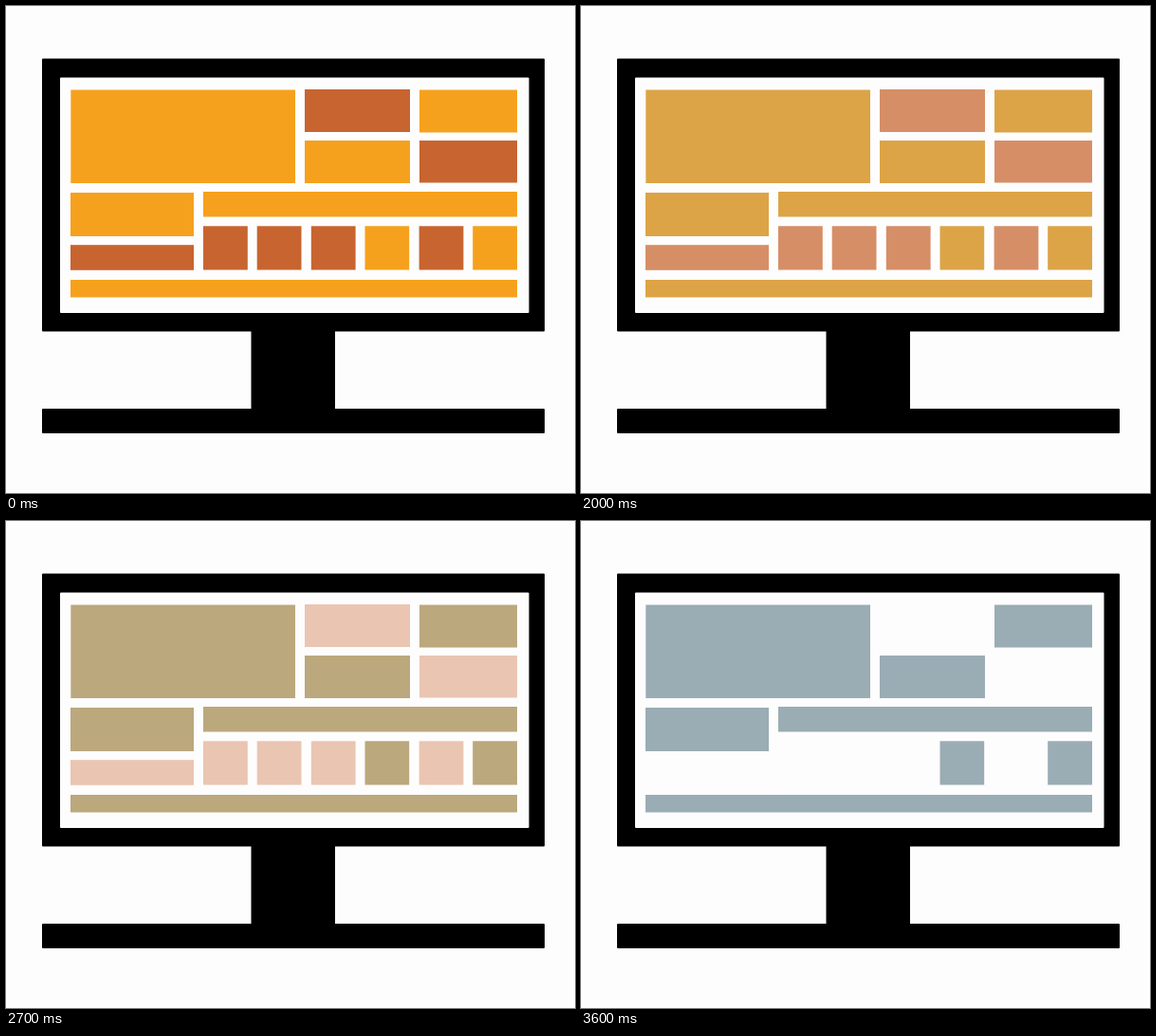
An HTML page that plays this animation: 600 by 514 pixels, repeating every 5 s.

```html
<!DOCTYPE html>
<html lang="en">
<head>
<meta charset="utf-8">
<title>Monitor with fading layout</title>
<style>
  html, body { margin: 0; width: 100%; height: 100%; overflow: hidden; background: #fefdfe; }
  svg { display: block; width: 100%; height: 100%; }
  .screen { fill: #fefdfe; }
  .main { animation: main-fade 5s infinite; }
  .accent { animation: accent-fade 5s infinite; }

  /* Hold, then fade in 100 ms steps, then hold until the hard restart. */
  @keyframes main-fade {
    0% { fill: rgb(246, 161, 29); animation-timing-function: step-end; }
    30% { fill: rgb(244, 161, 31); animation-timing-function: steps(19, end); }
    68%, 100% { fill: rgb(154, 172, 180); }
  }
  @keyframes accent-fade {
    0% { fill: rgb(200, 100, 47); animation-timing-function: step-end; }
    30% { fill: rgb(200, 102, 49); animation-timing-function: steps(19, end); }
    68%, 100% { fill: rgb(254, 253, 254); }
  }
</style>
</head>
<body>
<svg viewBox="0 0 600 514">
  <g class="monitor">
    <rect x="38" y="55.5" width="530" height="288" rx="1"/>
    <rect x="258.5" y="342" width="88.5" height="85"/>
    <rect x="38" y="425" width="530" height="26" rx="1"/>
    <rect class="screen" x="57" y="75.5" width="494.5" height="248.5" rx="1"/>
  </g>
  <g class="main">
    <rect x="68.3" y="88.5" width="236.7" height="98.5"/>
    <rect x="436" y="88.5" width="103" height="45"/>
    <rect x="315" y="142" width="111" height="45"/>
    <rect x="68" y="197" width="130" height="46"/>
    <rect x="208" y="196" width="331" height="26.5"/>
    <rect x="378.5" y="232.3" width="46.7" height="46.2"/>
    <rect x="492.2" y="232.3" width="46.8" height="46.2"/>
    <rect x="68" y="289" width="471" height="18.5"/>
  </g>
  <g class="accent">
    <rect x="315" y="88" width="111" height="45"/>
    <rect x="436" y="142" width="103" height="44.5"/>
    <rect x="68" y="252.2" width="130" height="26.6"/>
    <rect x="208" y="232.3" width="46.8" height="46.2"/>
    <rect x="264.7" y="232.3" width="46.8" height="46.2"/>
    <rect x="321.8" y="232.3" width="46.8" height="46.2"/>
    <rect x="435.6" y="232.3" width="46.8" height="46.2"/>
  </g>
</svg>
</body>
</html>
```
